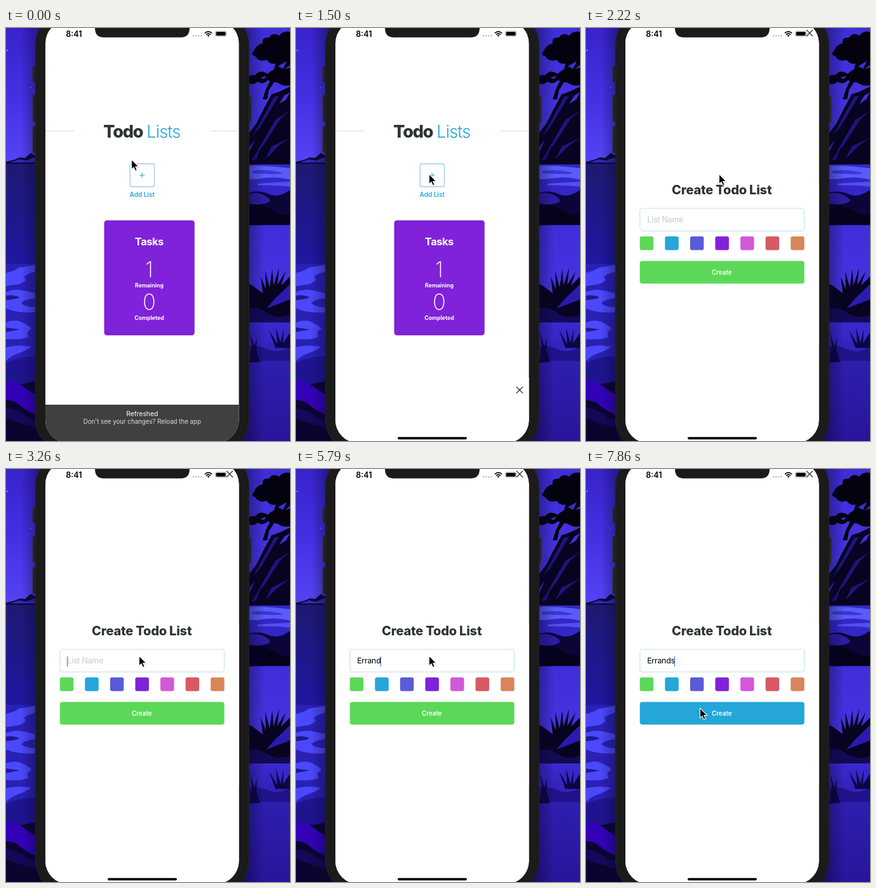
An HTML page that plays this animation: 447x648 px, repeating every 8000 ms.

```html
<!DOCTYPE html>
<html lang="en">
<head>
<meta charset="utf-8">
<title>Todo Lists</title>
<style>
  @property --typed { syntax: "<integer>"; inherits: true; initial-value: 0; }

  html, body { margin: 0; width: 100%; height: 100%; overflow: hidden; background: #1b1080; }
  svg { display: block; width: 447px; height: 648px; font-family: Inter, "Noto Sans", sans-serif; }
  .mid { text-anchor: middle; }
  .blue { fill: #24a6d9; }
  .ink { fill: #2d3436; }
  .white { fill: #fff; }

  .toast, .modal, .submit, .caret, .cursor {
    animation: 8s step-end -8ms infinite;
  }
  .toast { animation-name: dismiss; }
  .modal { animation-name: slide, type; }
  .submit { animation-name: recolor; }
  .caret { animation-name: blink; }
  .cursor { animation-name: point; }

  .placeholder { opacity: calc(1 - var(--typed)); }
  .field { font-size: 12.3px; line-height: 35px; white-space: nowrap; color: #000; }
  .field span {
    font-size: clamp(0px, (var(--typed) - var(--i)) * 100px, 12.3px);
    letter-spacing: -.018em;
  }
  .caret {
    display: inline-block; width: 1.4px; height: 16px; margin-left: -.5px;
    vertical-align: middle; background: #4f6ce6;
  }

  @keyframes dismiss {
    0% { opacity: 1; }
    7.5% { opacity: .5; }
    9.375%, 100% { opacity: 0; }
  }
  @keyframes slide {
    0% { transform: translateY(670px); }
    18.75% { transform: translateY(560px); }
    22.5% { transform: translateY(156px); }
    24.75% { transform: translateY(58px); }
    27.75%, 100% { transform: none; }
  }
  @keyframes type {
    0% { --typed: 0; }
    57.5% { --typed: 1; }
    61.125% { --typed: 2; }
    63% { --typed: 3; }
    64.875% { --typed: 4; }
    68.625% { --typed: 5; }
    72.375% { --typed: 6; }
    74.25%, 100% { --typed: 7; }
  }
  @keyframes blink {
    0% { opacity: 0; }
    38.875% { opacity: 1; }
    48.125% { opacity: .4; }
    50% { opacity: 0; }
    51.875% { opacity: .5; }
    53.75% { opacity: 1; }
    85.375% { opacity: .35; }
    87.25% { opacity: 0; }
    89.125% { opacity: .5; }
    91%, 100% { opacity: 1; }
  }
  @keyframes recolor {
    0% { fill: #5cd859; }
    91%, 100% { fill: #24a6d9; }
  }
  @keyframes point {
    0% { transform: translate(198px, 207px); }
    5.625% { transform: translate(200px, 213px); }
    7.5% { transform: translate(206px, 231px); }
    9.375% { transform: translate(213px, 251px); }
    11.25% { transform: translate(216px, 261px); }
    13.125% { transform: translate(215px, 256px); }
    15% { transform: translate(212px, 243px); }
    16.875% { transform: translate(210px, 232px); }
    18.75% { transform: translate(210px, 230px); }
    31.375% { transform: translate(210px, 238px); }
    33.25% { transform: translate(210px, 258px); }
    35.125% { transform: translate(210px, 282px); }
    37% { transform: translate(210px, 294px); }
    81.625% { transform: translate(203px, 299px); }
    83.5% { transform: translate(182px, 317px); }
    85.375% { transform: translate(158px, 335px); }
    87.25% { transform: translate(141px, 337px); }
    89.125% { transform: translate(136px, 337px); }
    94.625% { transform: translate(144px, 345px); }
    96.375% { transform: translate(166px, 364px); }
    98.25%, 100% { transform: translate(180px, 376px); }
  }
</style>
</head>
<body>
<svg viewBox="0 0 447 648">
  <defs>
    <linearGradient id="dusk" x2="0" y2="1">
      <stop stop-color="#3823ca"/><stop offset=".5" stop-color="#4430e2"/><stop offset="1" stop-color="#5444f4"/>
    </linearGradient>
    <linearGradient id="night" x2="0" y2="1">
      <stop stop-color="#1e1a72"/><stop offset="1" stop-color="#2016a4"/>
    </linearGradient>
    <linearGradient id="sky" x2="0" y2="1">
      <stop stop-color="#3f2ed8"/><stop offset="1" stop-color="#4836e4"/>
    </linearGradient>
    <linearGradient id="deep" x2="0" y2="1">
      <stop stop-color="#3a2ad0"/><stop offset=".35" stop-color="#2e1eae"/><stop offset="1" stop-color="#27169a"/>
    </linearGradient>
    <linearGradient id="shade">
      <stop stop-color="#08042c" stop-opacity="0"/><stop offset="1" stop-color="#08042c" stop-opacity=".55"/>
    </linearGradient>
    <clipPath id="screen"><rect x="62" y="-12" width="304.6" height="663" rx="36"/></clipPath>
  </defs>

  <!-- wallpaper, left -->
  <path fill="url(#dusk)" d="M0 0H70V214H0z"/>
  <path fill="#0b0636" d="M0 213V210L12 207 22 203 30 204 39 196 50 202V213z"/>
  <path fill="#3526b8" d="M6 211 20 206 32 208 44 203 50 208V211z"/>
  <g class="white"><circle cx="2" cy="35" r=".8"/><circle cx="39" cy="93" r=".6"/></g>
  <path fill="url(#night)" d="M0 213H70V380H0z"/>
  <path fill="#2a20b4" d="M0 370H70V560H0z"/>
  <g fill="#4a48f8">
    <path d="M0 384Q12 382 20 376L50 371V382Q34 384 28 391 36 396 20 402L0 405z"/>
    <path d="M0 414Q14 408 28 412L46 416V424Q28 426 24 432 32 438 46 438V446Q18 448 0 440z"/>
    <path d="M0 462Q14 456 26 462T40 472Q30 478 36 484 26 490 0 488z"/>
    <path d="M0 501Q18 496 40 500 30 507 20 510T0 522z"/>
  </g>
  <path fill="#211790" d="M0 420Q8 418 18 421T0 427zM0 470 22 473 0 477z"/>
  <path fill="#1f1490" d="M0 526Q24 512 70 516V570H0z"/>
  <path fill="#0a0530" d="M0 575Q12 557 28 558L70 550V648H0z"/>
  <path fill="#3302b8" d="M0 554Q16 553 24 560T46 575V606Q30 600 22 592T0 584z"/>
  <path fill="#150858" d="M0 596Q24 600 34 612L60 618V630Q24 622 0 612z"/>

  <!-- wallpaper, right -->
  <path fill="url(#sky)" d="M370 0H447V214H370z"/>
  <g fill="#04020f">
    <path d="M404 24Q402 14 414 15 420 6 430 12 436 4 447 6V52Q436 60 428 54 418 60 410 50 398 54 392 44 384 42 390 36 394 26 404 24z"/>
    <path d="M378 84Q380 72 392 74 400 64 412 72 424 60 434 66L447 62V90Q436 92 428 86 418 84 412 82 404 90 396 84 388 92 378 84z"/>
    <path d="M426 50 418 78 409 96 404 112H411L414 97 432 70 447 58V48z"/>
  </g>
  <path fill="#3e2ed4" d="M428 60 442 52 436 64zM400 78 410 75 406 80z"/>
  <path fill="#070320" d="M447 92 430 100 418 104 404 130 394 150 380 168V214H447z"/>
  <path fill="#20147c" d="M422 108 430 106 400 156 388 170zM447 130 432 143 404 186 396 192 424 144zM447 172 428 186 408 206 418 186zM386 208 402 184 394 206z"/>
  <path fill="#4030d6" d="M447 101 438 106 430 119 441 112zM383 187 392 175 383 194z"/>

  <path fill="#3426c6" d="M370 214H447V312H370z"/>
  <path fill="#595cf6" d="M370 217Q400 214 447 220V238Q424 232 402 236T370 232z"/>
  <path fill="#3d34d8" d="M388 224Q410 221 430 226T388 228z"/>
  <path fill="#5150ee" d="M396 244 447 241V249Q424 246 396 247z"/>
  <path fill="#0b0538" d="M370 262Q396 252 412 260T447 254V308L370 310z"/>
  <path fill="#2c1ea4" d="M383 260Q398 256 412 266T383 278z"/>
  <path fill="#05021c" d="M370 276Q400 274 420 286T447 290V309H370z"/>

  <path fill="url(#sky)" d="M370 310H447V462H370z"/>
  <path fill="#070320" d="M370 396 388 404 404 416 401 390 409 410 408 381 415 407 419 378 421 404 430 376 427 403 440 382 433 404 447 390V462H370z"/>
  <path fill="#2a1ab0" d="M447 402 424 424 410 440 447 426z"/>
  <path fill="#130a56" d="M370 444Q394 434 410 446T447 450V462H370z"/>

  <path fill="url(#deep)" d="M370 462H447V648H370z"/>
  <path fill="#20138a" d="M370 500Q396 496 412 504T447 500V523Q410 520 370 526z"/>
  <path fill="#0c0644" d="M383 525 387 498 384 478 391 500 395 486 394 506 400 524zM424 502 414 474 427 496 425 470 432 494 437 472 436 495 447 478V502z"/>

  <path fill="url(#shade)" d="M24 0H60V648H24z"/>
  <path fill="url(#shade)" transform="matrix(-1 0 0 1 429 0)" d="M22 0H60V648H22z"/>

  <!-- phone -->
  <g fill="#222" stroke="#333336" stroke-width=".8">
    <rect x="42" y="60" width="6" height="25" rx="1.5"/>
    <rect x="42" y="105" width="6" height="42" rx="1.5"/>
    <rect x="42" y="154" width="6" height="42" rx="1.5"/>
    <rect x="380" y="107" width="6" height="41" rx="1.5"/>
    <rect x="46.2" y="-26" width="336.4" height="693" rx="53" fill="#1b1b1b" stroke="#262628"/>
  </g>

  <g clip-path="url(#screen)">
    <path class="white" d="M62-12H367V651H62z"/>

    <g class="home">
      <path stroke="#cbe4ef" stroke-width="1.2" d="M62 161.5H108M321 161.5H367"/>
      <text class="ink" x="153.3" y="172" font-size="27" font-weight="800" letter-spacing="-1.2">Todo</text>
      <text class="blue" x="221.2" y="172" font-size="27" font-weight="300" letter-spacing="-.8">Lists</text>
      <rect x="195.3" y="213" width="38.2" height="36" rx="3" fill="none" stroke="#a5cbdc" stroke-width="1.3"/>
      <path stroke="#24a6d9" d="M210 231H218.5M214.2 226.7V235.3"/>
      <text class="mid blue" x="214.3" y="264.7" font-size="10" font-weight="600">Add List</text>
      <rect x="154.5" y="301.7" width="142.3" height="180.6" rx="4.5" fill="#8022d9"/>
      <g class="mid white">
        <text x="225.3" y="341" font-size="16.5" font-weight="700" letter-spacing="-.5">Tasks</text>
        <g font-size="34.5" font-weight="200">
          <text x="225.3" y="390.5">1</text>
          <text x="225.3" y="441.5">0</text>
        </g>
        <g font-size="8.7" font-weight="700">
          <text x="225.5" y="407">Remaining</text>
          <text x="225.5" y="458">Completed</text>
        </g>
      </g>
    </g>

    <g class="modal">
      <path class="white" d="M62-12H367V651H62z"/>
      <path stroke="#2d3436" stroke-width="1.4" d="M347 3 357 13M357 3 347 13"/>
      <text class="mid ink" x="213.7" y="261" font-size="20" font-weight="800" letter-spacing="-.2">Create Todo List</text>
      <rect x="84.9" y="283" width="258.6" height="35.5" rx="4" fill="none" stroke="#c0e2f0" stroke-width="1.1"/>
      <text class="placeholder" x="96.4" y="305" font-size="12.4" letter-spacing="-.2" fill="#c7c7cd">List Name</text>
      <foreignObject x="96.2" y="283" width="240" height="35">
        <div class="field"><span style="--i:0">E</span><span style="--i:1">r</span><span style="--i:2">r</span><span style="--i:3">a</span><span style="--i:4">n</span><span style="--i:5">d</span><span style="--i:6">s</span><i class="caret"></i></div>
      </foreignObject>
      <g id="swatches"></g>
      <rect class="submit" x="84.7" y="365.5" width="259" height="35.5" rx="4"/>
      <text class="mid white" x="213.8" y="386.7" font-size="9.9" font-weight="600">Create</text>
    </g>

    <rect x="160" y="641.7" width="109" height="3.8" rx="1.9"/>

    <g class="toast mid">
      <path fill="#404040" d="M62 591H367V651H62z"/>
      <text class="white" x="214.3" y="608.5" font-size="10.4">Refreshed</text>
      <text x="214.3" y="620.6" font-size="9.7" fill="#dcdcdc">Don't see your changes? Reload the app</text>
    </g>

    <!-- status bar -->
    <text x="94.3" y="13.8" font-size="12.5" font-weight="600">8:41</text>
    <path stroke="#bcbcbc" stroke-width="2.6" stroke-linecap="round" stroke-dasharray="0 4.1" d="M295.2 12.3H308"/>
    <g fill="none" stroke="#000" stroke-width="1.7">
      <path d="M312.9 8.2Q318.5 3.2 324.1 8.2M315 10.4Q318.5 7.3 322 10.4"/>
      <path fill="#000" stroke="none" d="M318.5 13.7 316.5 11.7Q318.5 10.2 320.5 11.7z"/>
    </g>
    <rect x="329.4" y="4.9" width="17.4" height="8.4" rx="2.4" fill="none" stroke="#999" stroke-width=".8"/>
    <rect x="330.6" y="6.1" width="15" height="6" rx="1.4"/>
    <path fill="#999" d="M347.7 7.6Q349.4 9.1 347.7 10.6z"/>
  </g>
  <path fill="#1b1b1b" d="M140-12V0Q140 14.8 154 14.8H275Q289 14.8 289 0V-12z"/>

  <g class="cursor">
    <path fill="#000" opacity=".18" d="M0 1V16L4 13 6 18.5 9 17 7 12.5H12z"/>
    <path stroke="#fff" stroke-width="1.1" stroke-linejoin="round" d="M-.6-.8V14.8L3 11.6 5.4 17.2 8.2 16 5.8 10.6H10.8z"/>
  </g>
</svg>
<script>
  const colors = ["#5cd859", "#24a6d9", "#595bd9", "#8022d9", "#d159d8", "#d85963", "#d88559"];
  document.getElementById("swatches").innerHTML = colors.map((color, i) =>
    `<rect x="${84.7 + i * 39.58}" y="327" width="21.5" height="21.5" rx="3" fill="${color}"/>`).join("");
</script>
</body>
</html>
```
